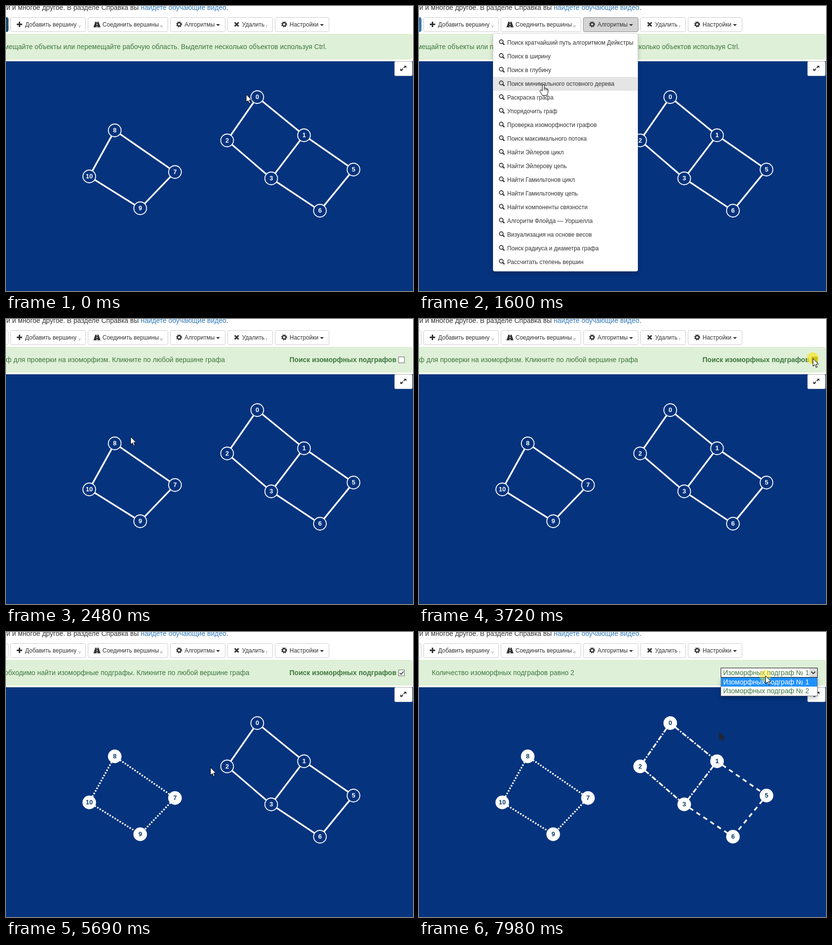
An HTML page that plays this animation: 831 px wide and 582 px high, repeating every 8000 ms.

```html
<!DOCTYPE html>
<html lang="ru">
<head>
<meta charset="utf-8">
<style>
html, body { margin: 0; width: 100%; height: 100%; overflow: hidden; background: #fff; }
svg { display: block; width: 831px; height: 582px; font: 14px "Liberation Sans", Arial, sans-serif; }
text { white-space: pre; }
.small { font-size: 12px; fill: #333; }
.key { font-size: 9px; fill: #999; }
.msg { fill: #3c763d; }
.end { text-anchor: end; }
.box { fill: #fff; stroke: #ccc; }
.icon { fill: none; stroke: #333; }
.edge { stroke: #fff; stroke-width: 3.4; }
.node { fill: #05337e; stroke: #fff; stroke-width: 1.8; }
.label { font-size: 13px; font-weight: bold; fill: #fff; text-anchor: middle; }
.sel .node { fill: #fff; }
.sel .label { fill: #0b3a62; }
.sel .dot { stroke-dasharray: 3 3; }
.sel .dashdot { stroke-dasharray: 10 3 3 3; }
.sel .dash { stroke-dasharray: 9 8; }
.panel { filter: drop-shadow(0 5px 5px rgba(0, 0, 0, .2)); }
</style>
</head>
<body>
<svg id="stage" viewBox="0 0 831 582"></svg>
<script>
const NS = 'http://www.w3.org/2000/svg';
const stage = document.getElementById('stage');
const LOOP = 8000;

function add(parent, tag, attrs = {}, content) {
  const el = document.createElementNS(NS, tag);
  for (const k in attrs) el.setAttribute(k, attrs[k]);
  if (content !== undefined) el.textContent = content;
  return parent.appendChild(el);
}
const group = (attrs, parent = stage) => add(parent, 'g', attrs);
const text = (p, x, y, s, cls, attrs = {}) => add(p, 'text', { x, y, class: cls, ...attrs }, s);
const path = (p, d, attrs = {}) => add(p, 'path', { d, ...attrs });
const rect = (p, x, y, width, height, attrs = {}) => add(p, 'rect', { x, y, width, height, ...attrs });
const circle = (p, cx, cy, r, attrs = {}) => add(p, 'circle', { cx, cy, r, ...attrs });
const show = (el, on) => { el.style.display = on ? '' : 'none'; };

// Heading line
text(stage, 271, 8, 'возможности и многое другое. В разделе Справка вы', 'end', { fill: '#333' });
text(stage, 275, 8, 'найдете обучающие видео', '', { fill: '#337ab7' });
text(stage, 450, 8, '.', '', { fill: '#333' });

// Toolbar
const button = (x, w) => rect(stage, x + .5, 23.5, w - 1, 29, { rx: 3, class: 'box' });
const modeButton = button(-60, 65);
const caret = x => path(stage, `M${x} 37h8l-4 4z`, { fill: '#333' });
function gear(x, y) {
  circle(stage, x, y, 3.5, { class: 'icon', 'stroke-width': 2.4 });
  circle(stage, x, y, 5.2, { class: 'icon', 'stroke-width': 1.8, 'stroke-dasharray': '2.1 1.984' });
}
button(9, 154);
path(stage, 'M22 37.5h11M27.5 32v11', { class: 'icon', 'stroke-width': 3 });
text(stage, 39, 42, 'Добавить вершину', 'small');
text(stage, 148, 44, 'v', 'key');
button(167, 164);
path(stage, 'M182.5 32h6.5l4 11.500h-14.500z', { fill: '#333' });
path(stage, 'M185.800 32v12', { stroke: '#fff', 'stroke-width': 1.6, 'stroke-dasharray': '2.500 2' });
text(stage, 197, 42, 'Соединить вершины', 'small');
text(stage, 315, 44, 'e', 'key');
const algoButton = button(335, 113);
gear(353.5, 37.5);
text(stage, 364.5, 42, 'Алгоритмы', 'small');
caret(429);
button(452, 93);
path(stage, 'M467 33.5l8 8M475 33.5l-8 8', { class: 'icon', 'stroke-width': 3 });
text(stage, 482, 42, 'Удалить', 'small');
text(stage, 531, 44, 'r', 'key');
button(549, 111);
gear(568, 37.5);
text(stage, 579, 42, 'Настройки', 'small');
caret(641);

// Message bar
rect(stage, -20, 57.5, 849.5, 51, { rx: 4, fill: '#dff0d8', stroke: '#d6e9c6' });
const messages = [
  text(stage, 655, 88, 'Перемещайте объекты или перемещайте рабочую область. Выделите несколько объектов используя Ctrl.', 'msg end'),
  text(stage, 447, 88, 'Выделите первый граф для проверки на изоморфизм. Кликните по любой вершине графа', 'msg end'),
  text(stage, 0, 88, 'Выделите граф шаблон - этот граф будет искаться в другом графе', 'msg'),
  text(stage, 497, 88, 'Выделите граф, в котором необходимо найти изоморфные подграфы. Кликните по любой вершине графа', 'msg end'),
  text(stage, 26, 88, 'Количество изоморфных подграфов равно 2', 'msg')
];
messages[2].setAttribute('x', 447 - messages[1].getComputedTextLength());

const option = group();
text(option, 797, 88, 'Поиск изоморфных подграфов', 'msg end', { 'font-weight': 'bold' });
const check = rect(option, 801.5, 77.5, 12, 12, { fill: '#fff', stroke: '#666' });
const tick = path(option, 'M804 83.500l2.700 3 5-6', { class: 'icon', 'stroke-width': 1.8 });

const select = group();
const selectBox = rect(select, 616.5, 73.5, 197, 19, { fill: '#fff' });
text(select, 621, 88, 'Изоморфных подграф № 1', 'msg');
rect(select, 797, 74, 16, 18, { fill: '#dcdcdc' });
path(select, 'M801 81l4 4 4-4', { class: 'icon', 'stroke-width': 1.8 });

// Work area
rect(stage, 0, 112, 831, 1, { fill: '#ddd' });
rect(stage, 0, 113, 831, 469, { fill: '#05337e' });
rect(stage, 793.5, 113.5, 36, 29, { rx: 2, class: 'box' });
path(stage, 'M812.500 122h5v5zM810 132.500h-5v-5z', { fill: '#333' });
path(stage, 'M812 126.500l3.500-3.500M810.500 128l-3.500 3.500', { class: 'icon', 'stroke-width': 2 });

const nodes = {
  0: [513, 186], 1: [608.5, 264], 2: [451.5, 274.5], 3: [541.5, 352], 5: [709.5, 334],
  6: [641, 418], 7: [345, 339], 8: [222, 254], 9: [274, 413], 10: [170, 348]
};
function graph(ids, edges) {
  const g = group();
  for (const [a, b, kind] of edges) {
    const [x1, y1] = nodes[a], [x2, y2] = nodes[b];
    const k = 13 / Math.hypot(x2 - x1, y2 - y1), dx = (x2 - x1) * k, dy = (y2 - y1) * k;
    add(g, 'line', { x1: x1 + dx, y1: y1 + dy, x2: x2 - dx, y2: y2 - dy, class: 'edge ' + kind });
  }
  for (const id of ids) {
    const [x, y] = nodes[id];
    circle(g, x, y, 13, { class: 'node' });
    text(g, x, y + 4, id, 'label');
  }
  return g;
}
const pattern = graph([7, 8, 9, 10], [[8, 7, 'dot'], [8, 10, 'dot'], [10, 9, 'dot'], [7, 9, 'dot']]);
const target = graph([0, 1, 2, 3, 5, 6], [
  [0, 1, 'dashdot'], [0, 2, 'dashdot'], [2, 3, 'dashdot'], [1, 3, 'dashdot'],
  [1, 5, 'dash'], [5, 6, 'dash'], [3, 6, 'dash']
]);

// Algorithm menu
const menu = group({ class: 'panel' });
rect(menu, 151, 56, 296, 486, { rx: 4, fill: '#fff', stroke: 'rgba(0,0,0,.15)' });
const hover = rect(menu, 151, 61, 296, 28, { fill: '#e5e5e5' });
[
  'Поиск кратчайший путь алгоритмом Дейкстры', 'Поиск в ширину', 'Поиск в глубину',
  'Поиск минимального остовного дерева', 'Раскраска графа', 'Упорядочить граф',
  'Проверка изоморфности графов', 'Поиск максимального потока', 'Найти Эйлеров цикл',
  'Найти Эйлерову цепь', 'Найти Гамильтонов цикл', 'Найти Гамильтонову цепь',
  'Найти компоненты связности', 'Алгоритм Флойда — Уоршелла', 'Визуализация на основе весов',
  'Поиск радиуса и диаметра графа', 'Рассчитать степень вершин'
].forEach((name, i) => {
  const y = 75 + 28 * i;
  circle(menu, 168, y - 2, 3.8, { class: 'icon', 'stroke-width': 1.8 });
  path(menu, `M170.800 ${y + .8}l3.600 3.600`, { class: 'icon', 'stroke-width': 2.4 });
  text(menu, 180, y + 4, name, 'small');
});

// Result list
const list = group({ class: 'panel' });
rect(list, 616.5, 93.5, 197, 37, { fill: '#fff', stroke: '#777' });
rect(list, 617, 93, 196, 18.5, { fill: '#1e90ff' });
text(list, 621, 107, 'Изоморфных подграф № 1', '', { fill: '#fff' });
text(list, 621, 125, 'Изоморфных подграф № 2', 'msg');

// Pointer
const ARROW = 'M.5 .5V16.500L4.200 13 6.800 19 9.200 18 6.700 12.100H11.500Z';
const trace = path(stage, ARROW, { transform: 'translate(613 204)', fill: '#22262e', stroke: '#22262e' });
const ring = circle(stage, 0, 0, 12, { fill: '#f8e71c' });
const pointer = group();
const arrow = path(pointer, ARROW, { fill: '#fff', stroke: '#000' });
const hand = group({ fill: '#fff', stroke: '#000', 'stroke-linejoin': 'round' }, pointer);
path(hand, 'M-2 13V2Q-2 .500 0 .500T2 2V8Q3.500 6.500 5 8.500Q6.500 7.500 7.500 9.500Q9.500 9 9.500 11.500V15Q9.500 18 7 22.500H-2.500Q-3.500 19.500-6.500 15.500Q-8 12.500-6 11.500Q-4 11-2 13Z');
path(hand, 'M2 8v4M5 8.500v4M7.500 9.500v3', { fill: 'none' });

// Moves: start, end, x, y and an optional bend point
const moves = [
  [0, 0, 490, 180],
  [30, 800, 408, 38, 411, 145],
  [1140, 1600, 254, 160],
  [1600, 1800, 254, 178],
  [1800, 2210, 254, 240],
  [2480, 3120, 790, 78],
  [3190, 3390, 804, 80],
  [3920, 4510, 238, 254],
  [4640, 4910, 219, 254],
  [5170, 5490, 410, 276],
  [5620, 5890, 453, 276],
  [6220, 6280, 453, 277],
  [6550, 7230, 712, 104, 643, 219],
  [7270, 7700, 707, 89]
];
function pointerAt(t) {
  let x = 0, y = 0;
  for (const [start, end, ex, ey, bx = (x + ex) / 2, by = (y + ey) / 2] of moves) {
    if (t < start) break;
    const k = end > start ? Math.min(1, (t - start) / (end - start)) : 1;
    const e = k * k * (3 - 2 * k);
    const bend = (a, b, c) => a * (1 - e) ** 2 + 2 * b * e * (1 - e) + c * e * e;
    x = bend(x, bx, ex);
    y = bend(y, by, ey);
  }
  return [x, y];
}

// Clicks: start, length
const clicks = [[1010, 60], [2410, 70], [3720, 130], [5100, 70], [6480, 70], [7840, 160]];
const paint = (el, fill, stroke) => { el.setAttribute('fill', fill); el.style.fill = fill; el.style.stroke = stroke; };

function render(t) {
  const [x, y] = pointerAt(t);
  const menuOpen = t >= 1140 && t < 2480;
  const overButton = t < 1140 && y < 53;

  if (t < 1010) paint(modeButton, '#204d74', '#122b40');
  else if (t < 2480) paint(modeButton, '#337ab7', '#2e6da4');
  else paint(modeButton, '#fff', '#ccc');
  if (menuOpen || (overButton && t >= 1010)) paint(algoButton, '#d4d4d4', '#8c8c8c');
  else if (overButton) paint(algoButton, '#e6e6e6', '#adadad');
  else paint(algoButton, '#fff', '#ccc');

  const current = [2480, 3850, 5170, 6550].filter(s => t >= s).length;
  messages.forEach((m, i) => show(m, i === current));
  show(option, current > 0 && current < 4);
  paint(check, t >= 3720 && t < 3850 ? '#817800' : '#fff', '#666');
  show(tick, t >= 3850);
  show(select, current === 4);
  selectBox.setAttribute('stroke', t >= 7300 ? '#111' : '#767676');
  show(list, t >= 7910);
  pattern.classList.toggle('sel', t >= 5170);
  target.classList.toggle('sel', t >= 6550);

  show(menu, menuOpen);
  const row = Math.floor((y - 61) / 28);
  show(hover, row >= 0 && x < 447);
  hover.setAttribute('y', 61 + 28 * row);

  const click = clicks.find(([s, len]) => t >= s && t < s + len);
  show(ring, !!click);
  if (click) {
    ring.setAttribute('cx', x);
    ring.setAttribute('cy', y);
    ring.setAttribute('opacity', .68 - .0015 * (t - click[0]));
  }
  show(trace, t >= 6930);
  pointer.setAttribute('transform', `translate(${Math.round(x)} ${Math.round(y)})`);
  show(hand, menuOpen || overButton);
  show(arrow, !menuOpen && !overButton);
}

const begin = performance.now();
function tickFrame() {
  render((performance.now() - begin) % LOOP);
  requestAnimationFrame(tickFrame);
}
tickFrame();
</script>
</body>
</html>
```
